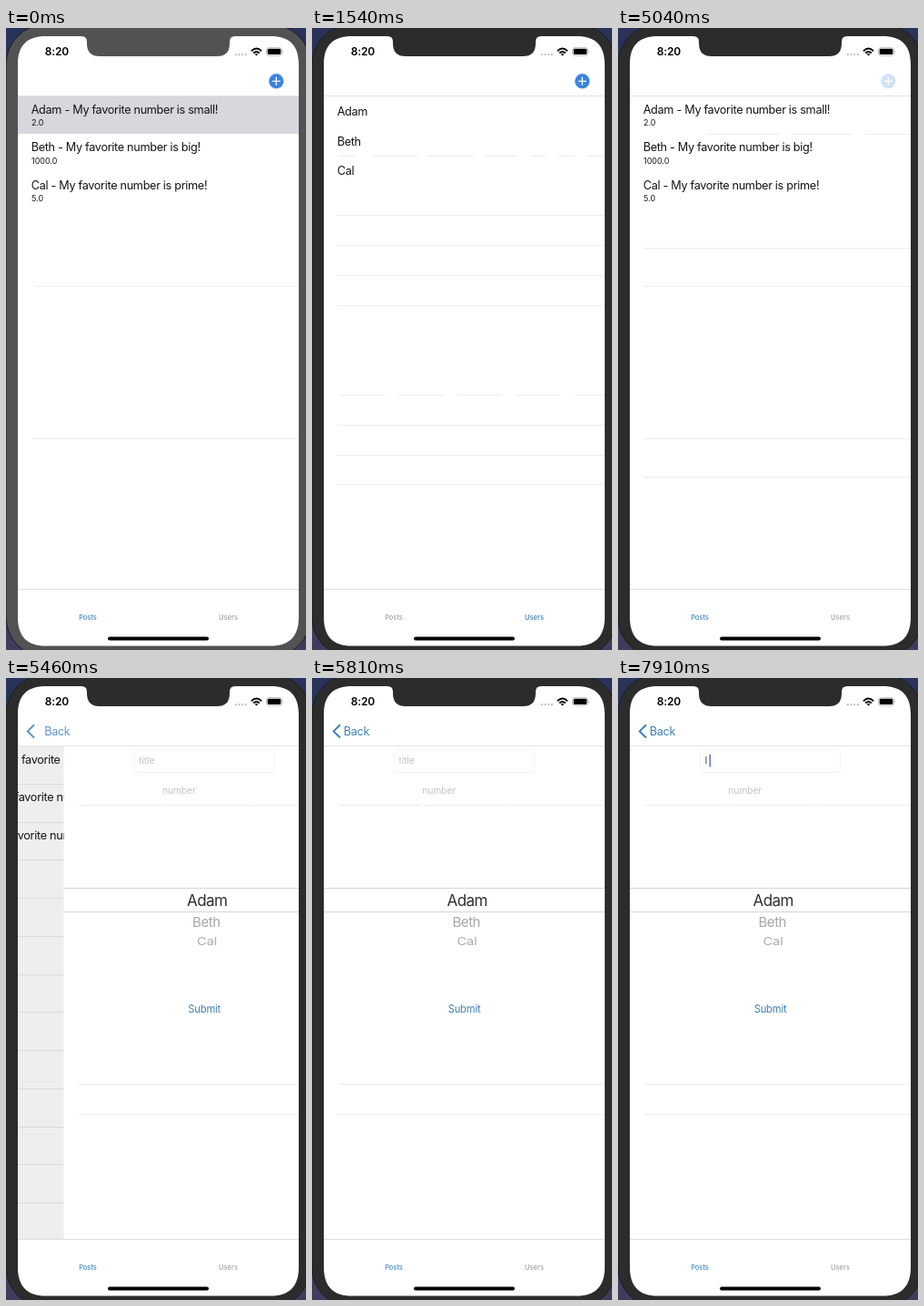
An HTML page that plays this animation: 330 by 682 pixels, repeating every 8000 ms.

```html
<!DOCTYPE html>
<html lang="en">
<head>
<meta charset="utf-8">
<title>Posts and users</title>
<style>
  html, body { margin: 0; width: 100%; height: 100%; overflow: hidden; background: #2b3150; }
  svg { display: block; width: 100vw; height: 100vh; }
  text { font-family: Inter, Roboto, sans-serif; fill: #151515; }
  .main { font-size: 12.7px; letter-spacing: -.32px; }
  .sub { font-size: 8.95px; }
  .clock { font-size: 12px; font-weight: 600; letter-spacing: -.1px; fill: #000; }
  .tab { font-size: 7.46px; font-weight: 500; text-anchor: middle; }
  .hint { font-size: 10.4px; letter-spacing: -.15px; fill: #c4c4c6; }
  .typed { font-size: 10.4px; fill: #444; }
  .submit { font-size: 11.2px; letter-spacing: -.18px; fill: #3f80b5; }
  .pick { font-size: 17px; letter-spacing: -.6px; fill: #303030; }
  .next { font-size: 15px; letter-spacing: -.45px; fill: #a6a6a6; }
  .last { font-size: 14.5px; fill: #aaa; }
  .blue { fill: #3d80b8; }
</style>
</head>
<body>
<svg viewBox="0 0 330 682" preserveAspectRatio="none">
  <defs>
    <clipPath id="body"><rect x="13" y="74" width="309" height="541"/></clipPath>
    <linearGradient id="desk" x1="0" y1="0" x2="0" y2="1">
      <stop offset="0" stop-color="#293258"/>
      <stop offset="1" stop-color="#403c5c"/>
    </linearGradient>
  </defs>
  <rect width="330" height="682" fill="url(#desk)"/>
  <rect id="bezel" x="0" y="-4" width="335" height="694" rx="44" stroke="#1c1c20" stroke-width="1"/>
  <path fill="#fff" d="M44 9H83Q89 9 89 15V17Q89 31 103 31H232Q246 31 246 17V15Q246 9 252 9H291
    C312 9 322 19 322 40V646C322 667 312 677.500 291 677.500H44C23 677.500 13 667 13 646V40C13 19 23 9 44 9Z"/>

  <g clip-path="url(#body)">
    <g id="posts">
      <rect id="chosen" x="13" y="74" width="309" height="42" fill="#d9d6dd"/>
      <g id="postText"></g>
      <g id="firstLines"></g>
      <g id="postLines"></g>
      <g id="moveLines"></g>
    </g>
    <g id="users"></g>
    <rect id="shade" x="13" y="74" width="309" height="541"/>
    <g id="form">
      <rect x="13" y="74" width="309" height="541" fill="#fff"/>
      <rect x="90.500" y="78.500" width="154" height="25" rx="3" fill="none" stroke="#f3f3f3"/>
      <g id="formLines"></g>
      <text id="title" class="hint" x="95.500" y="94.300">title</text>
      <text id="typed" class="typed" x="95.600" y="94.300">I</text>
      <rect id="caret" y="84" width="1.400" height="13.500" fill="#4a68c0"/>
      <text class="hint" x="121.300" y="127.300">number</text>
      <text class="pick" x="148.500" y="249.700">Adam</text>
      <text class="next" x="154.500" y="272.700">Beth</text>
      <text class="last" transform="translate(159.500 293) scale(1 .82)">Cal</text>
      <text class="submit" x="149.700" y="367.200">Submit</text>
    </g>
  </g>

  <rect id="navLine" x="13" y="74" width="309" height="1" fill="#e4e4e4"/>
  <rect x="13" y="615" width="309" height="1" fill="#dedede"/>
  <text class="clock" x="42.700" y="30.300">8:20</text>
  <g id="dots" fill="#bdbdbd"></g>
  <g fill="none" stroke="#000" stroke-width="1.900">
    <path d="M270 25.200Q275.500 20 281 25.200"/>
    <path d="M272.200 27.500Q275.500 24.400 278.800 27.500"/>
  </g>
  <path d="M273.700 28.700Q275.500 27.300 277.300 28.700L275.500 30.600Z"/>
  <rect x="286.500" y="21.700" width="17" height="8.500" rx="2.400" fill="none" stroke="#aaa" stroke-width=".8"/>
  <rect x="287.700" y="22.800" width="14.600" height="6.300" rx="1.400"/>
  <path d="M304.600 24.500Q306 26 304.600 27.500Z" fill="#aaa"/>

  <g id="plus">
    <circle cx="297.300" cy="58.300" r="8.700" fill="#d3e4f6"/>
    <circle cx="297.300" cy="58.300" r="8" fill="#3a83dc"/>
    <path d="M292.800 58.300H301.800M297.300 53.800V62.800" stroke="#fff" stroke-width="1.300"/>
  </g>
  <g id="back">
    <path d="M31 51.300L23.800 58.400L31 65.500" fill="none" stroke="#3d80c0" stroke-width="2"/>
    <text id="backText" class="main blue" y="62.700">Back</text>
  </g>
  <text id="postsTab" class="tab" x="90" y="649.200">Posts</text>
  <text id="usersTab" class="tab" x="244.500" y="649.200">Users</text>
  <rect x="112" y="667.500" width="111" height="4" rx="2" fill="#000"/>
</svg>
<script>
const LOOP = 8000, STEP = 70;
const PRESS = 5040, PUSH = 5250, PUSHED = 5810, FOCUS = 7070, TYPE = 7700, SPACE = 7910;
const WIDTH = 309, LEFT = 13, RIGHT = 322;
const $ = id => document.getElementById(id);

function add(parent, tag, attrs, text) {
  const el = document.createElementNS("http://www.w3.org/2000/svg", tag);
  for (const k in attrs) el.setAttribute(k, attrs[k]);
  if (text) el.textContent = text;
  $(parent).append(el);
}
const line = (parent, y, x1 = 28, x2 = RIGHT, fill = "#eeeeee") =>
  add(parent, "rect", { x: x1, y: Math.floor(y), width: x2 - x1, height: 1, fill });
const dashes = (parent, y, ...ends) => {
  for (let i = 0; i < ends.length; i += 2) line(parent, y, ends[i], ends[i + 1]);
};
const postRow = n => 74.5 + 41.75 * n;
const userRow = n => 74.5 + 32.8 * n;

// Static rows and separators
const people = [["Adam", "small", "2.0"], ["Beth", "big", "1000.0"], ["Cal", "prime", "5.0"]];
people.forEach(([name, kind, num], i) => {
  const y = postRow(i);
  add("postText", "text", { class: "main", x: 27.7, y: y + 19.2 }, `${name} - My favorite number is ${kind}!`);
  add("postText", "text", { class: "sub", x: 28, y: y + 32.3 }, num);
  add("users", "text", { class: "main", x: 27.7, y: userRow(i) + 21.2 }, name);
});
line("firstLines", postRow(5), 32);
line("firstLines", postRow(9));
dashes("postLines", postRow(1), 97, 178, 190, 257, 272, RIGHT);
[4, 5, 9, 10].forEach(n => line("postLines", postRow(n)));
for (let n = 1; n < 13; n++) line("moveLines", postRow(n), 28, RIGHT, "#e9e9e9");
dashes("users", userRow(2), 28, 49, 67, 116, 126, 178, 190, 226, 240, 257, 271, 289, 302, RIGHT);
for (let x = 31; x < RIGHT; x += 64.4) line("users", userRow(10), x, Math.min(x + 49, RIGHT));
[4, 5, 6, 7, 11, 12, 13].forEach(n => line("users", userRow(n)));
dashes("formLines", 139, 30, 120, 123, 216, 219, RIGHT);
line("formLines", 445, 29);
line("formLines", 478, 29);
line("formLines", 230, LEFT, RIGHT, "#d6d6d6");
line("formLines", 256, LEFT, RIGHT, "#d6d6d6");
for (let i = 0; i < 4; i++) add("dots", "circle", { cx: 252.8 + i * 3.7, cy: 29.2, r: 1.1 });

const show = (id, on) => $(id).setAttribute("display", on ? "inline" : "none");
const set = (id, attr, value) => $(id).setAttribute(attr, value);

// Share of the push still to go: 1 before, 0 when settled
function pushLeft(t) {
  if (t < PUSH) return 1;
  if (t >= PUSHED) return 0;
  const s = (t - PUSH + 35) * 0.0133;
  return (1 + s) * Math.exp(-s);
}

function draw(time) {
  const t = Math.floor(time / STEP) * STEP;
  const left = pushLeft(t), gone = 1 - left;
  const pushing = t >= PUSH, moving = pushing && t < PUSHED;
  const onUsers = t >= 1540 && t < 3640;

  set("bezel", "fill", t < 1400 ? "#525252" : "#2c2c2c");
  show("chosen", t < 1540);
  show("firstLines", t < 1540);
  show("postLines", t >= 3640 && !pushing);
  show("moveLines", moving);
  show("posts", !onUsers && t < PUSHED);
  show("users", onUsers);
  set("posts", "transform", `translate(${-0.3 * WIDTH * gone} 0)`);

  show("shade", moving);
  set("shade", "opacity", 0.08 * gone);
  show("form", pushing);
  set("form", "transform", `translate(${WIDTH * left} 0)`);

  show("back", pushing);
  set("back", "opacity", gone);
  set("backText", "x", 34.8 + 45 * left);
  set("plus", "opacity", pushing ? Math.max(0, 2 * left - 1) : t >= PRESS ? 0.22 : 1);

  show("title", t < TYPE);
  show("typed", t >= TYPE);
  show("caret", t >= FOCUS);
  set("caret", "x", t < TYPE ? 95.8 : t < SPACE ? 98.4 : 100.5);

  set("postsTab", "fill", "");
  $("postsTab").style.fill = onUsers ? "#a2a2a2" : "#4088c8";
  $("usersTab").style.fill = onUsers ? "#3a7cb4" : "#a2a2a2";
}

function tick() {
  draw(performance.now() % LOOP);
  requestAnimationFrame(tick);
}
tick();
</script>
</body>
</html>
```
